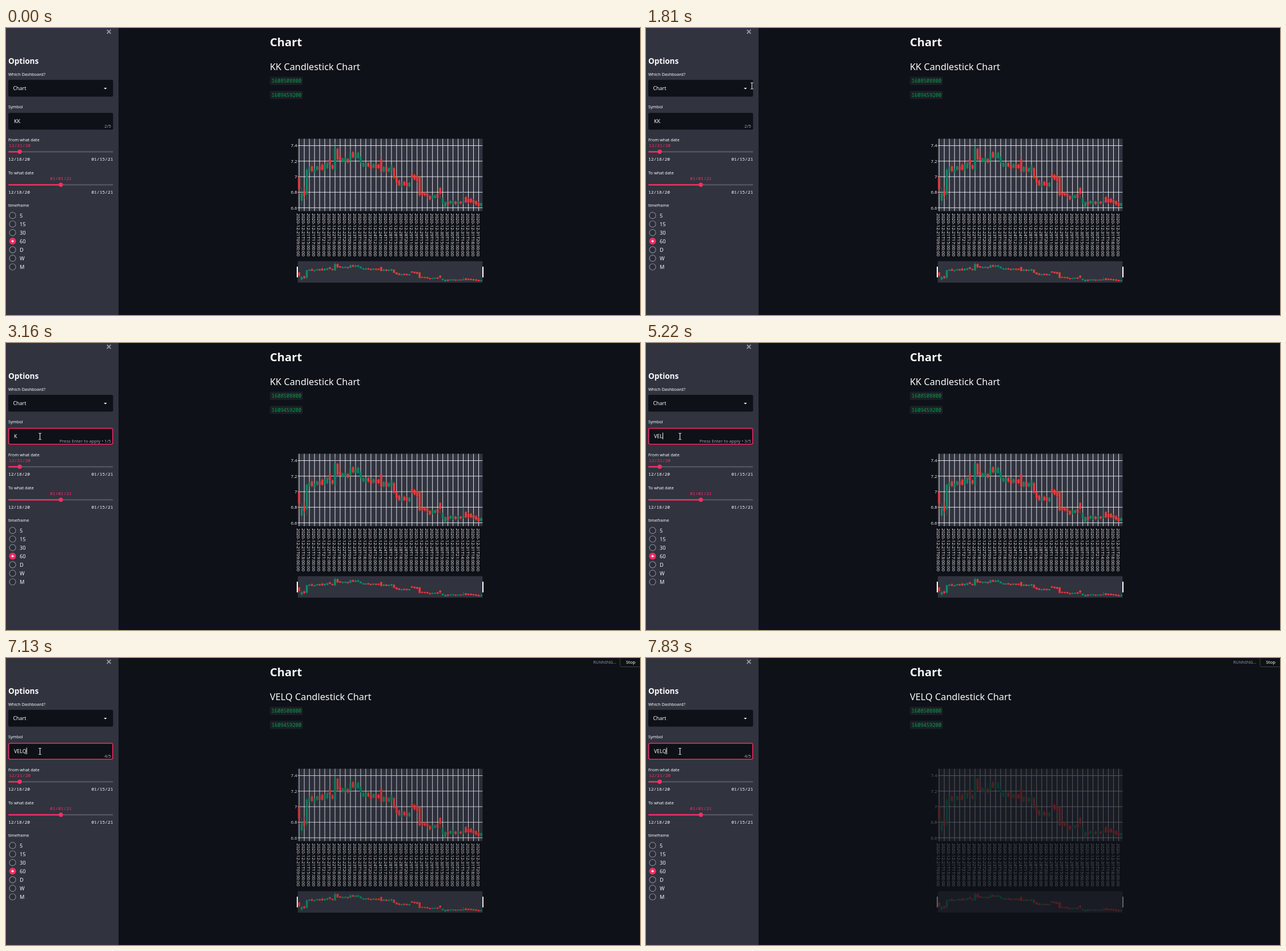
Write an HTML page that moves like this. It is 1110x504 px and loops after 8 s.

```html
<!DOCTYPE html>
<html lang="en">
<head>
<meta charset="utf-8">
<title>Candlestick dashboard</title>
<style>
  html, body { margin: 0; width: 100%; height: 100%; overflow: hidden; background: #0e1117; }
  svg { display: block; width: 100%; height: 100%; }
  text { font-family: "Noto Sans", sans-serif; fill: #fafafa; white-space: pre; }
  .mono { font-family: "Noto Sans Mono", monospace; }
  .tick { font-family: "Open Sans", sans-serif; }
  .red { fill: #f92d63; }
  .muted { fill: #a3a5ac; }
  .up { fill: #0f8a66; stroke: #0f8a66; }
  .down { fill: #e93c3c; stroke: #e93c3c; }
  #candles * { stroke-width: .7; vector-effect: non-scaling-stroke; }
  #tools path { fill: none; stroke: #5f6269; stroke-width: 1.4; }
  #tools path.lit { stroke: #b9bbc1; }
</style>
</head>
<body>
<svg id="stage" viewBox="0 0 1110 504" preserveAspectRatio="none"></svg>
<script>
const LOOP = 8000;
const FIRST = 'KK', SECOND = 'VELQ';
const RED = '#f92d63';

const text = (x, y, size, str, attrs = '') =>
  `<text x="${x}" y="${y}" font-size="${size}" ${attrs}>${str}</text>`;
const rect = (x, y, w, h, fill, attrs = '') =>
  `<rect x="${x}" y="${y}" width="${w}" height="${h}" fill="${fill}" ${attrs}/>`;
const path = (d, attrs = '') => `<path d="${d}" ${attrs}/>`;
const range = (n, fn) => Array.from({ length: n }, (_, i) => fn(i)).join('');

function slider(label, date, y, x) {
  return text(4, y - 18.5, 7.4, label) +
    text(x, y - 8, 7.9, date, 'class="mono red" text-anchor="middle"') +
    rect(4, y - 1, 183.5, 2.2, '#555762', 'rx="1"') +
    rect(4, y - 1, x - 4, 2.2, RED, 'rx="1"') +
    `<circle cx="${x}" cy="${y}" r="3.7" fill="${RED}"/>` +
    text(4, y + 15.8, 7.9, '12/18/20', 'class="mono"') +
    text(187.5, y + 15.8, 7.9, '01/15/21', 'class="mono" text-anchor="end"');
}

function radio(label, i) {
  const y = 329.2 + 15.05 * i;
  const dot = label === '60'
    ? `<circle cx="11.5" cy="${y}" r="6" fill="${RED}"/><circle cx="11.5" cy="${y}" r="1.9" fill="#fff"/>`
    : `<circle cx="11.5" cy="${y}" r="5.5" fill="#2b2d38" stroke="#85878e" stroke-width="1.2"/>`;
  return dot + text(24, y + 3.4, 9.2, label);
}

function sidebar() {
  return rect(0, 0, 197, 504, '#31333f') +
    path('M176.8 3.2l6.6 6.6M183.4 3.2l-6.6 6.6', 'stroke="#9a9ca4" stroke-width="1.8"') +
    text(4, 62.6, 13.5, 'Options', 'font-weight="700"') +
    text(4, 83.6, 7.4, 'Which Dashboard?') +
    rect(4, 91, 183.5, 29.5, '#0e1117', 'rx="2.5"') +
    text(12.5, 109, 8.9, 'Chart') +
    path('M171.4 105h5.2l-2.6 2.7z', 'fill="#fff"') +
    text(4, 140.8, 7.4, 'Symbol') +
    rect(4, 149, 183.5, 29.5, '#0e1117', 'rx="2.5"') +
    rect(4.7, 149.7, 182.1, 28, 'none', `id="focus" rx="2.2" stroke="${RED}" stroke-width="1.5"`) +
    text(14, 167, 8.9, '', 'id="symbol"') +
    path('M0 157.5v11.5', 'id="caret" stroke="#fff" stroke-width="1"') +
    text(184, 174.5, 7.7, '', 'id="hint" class="muted" text-anchor="end"') +
    slider('From what date', '12/21/20', 217.2, 24) +
    slider('To what date', '01/01/21', 275.2, 96) +
    text(4, 314, 7.4, 'timeframe') +
    ['5', '15', '30', '60', 'D', 'W', 'M'].map(radio).join('');
}

// Candle geometry in stage pixels; heights and wicks list only the exceptions.
const STEP = 4.49;
const tops = [
  262, 290, 286, 249, 245, 243, 248, 243, 243, 240, 240, 237,
  231, 241, 212, 212, 226, 229, 228, 230, 220, 218, 222, 219,
  227, 237, 238, 237, 241, 239, 240, 240, 230, 244, 244, 246,
  242, 246, 262, 268, 272, 270, 271, 272, 256, 258, 260, 262,
  289, 290, 290, 295, 295, 294, 292, 281, 300, 306, 305, 304,
  304, 305, 305, 305, 304, 297, 300, 300, 302, 304, 307, 308];
const heights = {
  0: 20, 1: 13, 2: 9, 3: 43, 5: 8, 9: 9, 10: 9, 11: 9, 12: 9, 14: 37, 15: 19,
  20: 13, 21: 9, 23: 9, 24: 9, 32: 22, 33: 8, 34: 8, 36: 8, 37: 17, 38: 10, 39: 8,
  45: 8, 46: 9, 47: 32, 48: 4, 49: 4, 52: 4, 53: 4, 55: 10, 56: 7, 57: 8,
  59: 4, 60: 4, 61: 4, 62: 4, 63: 3, 64: 3, 65: 9, 71: 4 };
const wicks = {
  0: [3, 10], 1: [9, 8], 2: [8, 5], 3: [3, 10], 5: [7, 3], 9: [8, 2], 14: [11, 4],
  20: [7, 2], 22: [8, 3], 32: [2, 3], 36: [2, 9], 55: [2, 9], 64: [16, 2] };
const trend = 'rgrggrggrr' + 'ggrrgrrggr' + 'grgggggrrg' + 'rrrgrggrrr' +
  'grrgrrrrrr' + 'rrggrrggrg' + 'grgrgrrrrr' + 'rg';

function candle(top, i) {
  const x = 513.2 + STEP * i, h = heights[i] || 6, [above, below] = wicks[i] || [2, 2.5];
  return `<g class="${trend[i] === 'g' ? 'up' : 'down'}">` +
    path(`M${x} ${top - above}V${top + h + below}`) +
    `<rect x="${x - 1.4}" y="${top}" width="2.8" height="${h}"/></g>`;
}

const hours = {
  21: '09 13 15 17 19 21', 22: '12 16 18 20', 23: '09 13 16 18 20', 24: '12 15 17',
  28: '12 15 18 20', 29: '11 13 15 17 19', 30: '13 15 17 19 21', 31: '14 16 18 20' };
const stamps = Object.entries(hours).flatMap(([day, list]) =>
  list.split(' ').map(hour => `2020-12-${day}T${hour}:00:00`));

function chart() {
  const grid = range(36, i => `M${513.2 + 2 * STEP * i} 194.5v127`) +
    range(5, i => `M510.8 ${206.5 + 27.3 * i}h323.6`);
  const axis = ['7.4', '7.2', '7', '6.8', '6.6'].map((v, i) =>
    text(509.6, 209.3 + 27.3 * i, 7.7, v, 'class="tick" text-anchor="end"')).join('');
  const dates = stamps.map((s, i) => {
    const x = 509.4 + 2 * STEP * i;
    return text(x, 325.5, 7.75, s, `class="tick" transform="rotate(90 ${x} 325.5)"`);
  }).join('');
  return '<g id="chart">' +
    rect(510.8, 194.5, 323.6, 127, '#31333f') +
    path(grid, 'stroke="#f2f2f4" stroke-width=".9"') +
    `<g id="candles">${tops.map(candle).join('')}</g>` + axis + dates +
    rect(510.8, 409.5, 323.6, 37.7, '#31333f') +
    '<use href="#candles" transform="matrix(1 0 0 .295 0 352.1)"/>' +
    rect(509, 419, 2, 19, '#fff', 'rx=".6"') + rect(834, 419, 2, 19, '#fff', 'rx=".6"') + '</g>';
}

// Icons are drawn around their centre point.
const icons = [
  [681.5, 'M-4.2 -2.2h2l1-1.2h2.4l1 1.2h2v5.6h-8.4zM-1.4 .5a1.4 1.4 0 1 0 2.8 0a1.4 1.4 0 1 0-2.8 0'],
  [700.5, 'M-3.6-1a2.9 2.9 0 1 0 5.8 0a2.9 2.9 0 1 0-5.8 0M1.5 1.2L4.6 4.3M-2.2-1h3M-.7-2.5v3', 1],
  [715.2, 'M-4.5 0h9M0-4.5v9M-3.3-1.3L-4.6 0l1.3 1.3M3.3-1.3L4.6 0 3.3 1.3M-1.3-3.3L0-4.6l1.3 1.3M-1.3 3.3L0 4.6l1.3-1.3'],
  [729.8, 'M-4.2-4.2h8.4v8.4h-8.4z', 0, '1.6 1.2'],
  [744.3, 'M-2.5 2.2C-6-1-3-4 .8-3.8S5.3 1 1.5 1.8S-3 .8-2.4 2.4L-3 4.6'],
  [763.5, 'M-3.3-3.3h6.6v6.6h-6.6zM-2 0h4M0-2v4'],
  [778, 'M-3.3-3.3h6.6v6.6h-6.6zM-2 0h4'],
  [792.3, 'M-4.4-4.4l8.8 8.8M4.4-4.4l-8.8 8.8M-4.4-2v-2.4h2.4M4.4-2v-2.4H2M-4.4 2v2.4H-2M4.4 2v2.4H2'],
  [807, 'M-4.6 .2L0-3.8 4.6 .2M-2.8 0v3.6h1.8V1H1v2.6h1.8V0'],
  [825.3, 'M-4.2-2.5h7.5M3.2-1v5', 0, '2 1'],
  [840.5, 'M-3.8 0l2.2-2h5.6v4h-5.6zM-2.5 0h6', 1],
  [855.2, 'M-3.8-2.2h7.8M-3.8 2.2h7.8M-3.8-1.2h7.8M-3.8 3.2h7.8'],
  [895, 'M-3.8-1v-2.8h2.8M-3.8-3.8l7.6 7.6M3.8 1v2.8H1', 1]];

function tools() {
  return '<g id="tools">' + icons.map(([x, d, lit, dash]) =>
    path(d, `transform="translate(${x} ${x > 880 ? 143.8 : 145})" class="${lit ? 'lit' : ''}" stroke-dasharray="${dash || 'none'}"`)
  ).join('') + rect(869.8, 140.5, 9, 9, '#4a5488') + '</g>';
}

function code(y, value) {
  return rect(462, y, 57.5, 14.5, '#1c1e28', 'rx="3"') +
    text(465, y + 10.3, 8.7, value, 'class="mono" style="fill:#09a040"');
}

const outlined = 'stroke-linejoin="round"';
const pointers =
  path('M0 0v10l2.3-2.1 1.6 3.6 1.6-.7L3.9 7.2H7z', `id="arrow" fill="#fff" stroke="#000" stroke-width=".7" ${outlined}`) +
  '<g id="resize">' +
    path('M-6.5 0l3.2-3v2.2h6.6V-3l3.2 3-3.2 3V.8h-6.6V3z', `fill="#fff" stroke="#000" stroke-width=".6" ${outlined}`) + '</g>' +
  path('M-2.3-5.3h1.8l.5.6.5-.6h1.8M0-4.7v9.6M-2.3 5.5h1.8l.5-.6.5.6h1.8', 'id="beam" fill="none" stroke="#fff" stroke-width="1"');

const stage = document.getElementById('stage');
stage.innerHTML = sidebar() +
  text(462, 32, 20.2, 'Chart', 'font-weight="700"') +
  text(462, 73.6, 16.3, '', 'id="title"') +
  code(85.5, '1608508800') + code(110.2, '1609459200') + chart() + tools() +
  '<g id="status">' + text(1028, 10.4, 7.4, 'RUNNING...', 'style="fill:#918ba8"') +
  rect(1075, -4, 50, 19.5, '#0e1117', 'rx="3" stroke="#3f414d"') +
  text(1085.5, 9.6, 7.8, 'Stop') + '</g>' + `<g id="cursor">${pointers}</g>`;

const el = id => document.getElementById(id);
const show = (id, on) => el(id).style.display = on ? '' : 'none';
const ramp = (t, start, length) => Math.min(1, Math.max(0, (t - start) / length));
const fade = (id, amount) => el(id).setAttribute('opacity', amount);

const track = [
  [190, 1091, 499], [960, 684, 261], [1030, 674.5, 208.5],
  [1810, 185.5, 101.5], [1880, 184, 103], [2300, 59.5, 163.8]];
const typing = [
  [0, FIRST], [3160, FIRST.slice(0, 1)], [3360, ''], [4620, SECOND.slice(0, 1)],
  [4820, SECOND.slice(0, 2)], [5220, SECOND.slice(0, 3)], [5680, SECOND]];
const blinks = [2500, 3030, 3560, 4090, 4620, 6230, 6740, 7270, 7800];

function moveCursor(t) {
  const next = track.findIndex(k => k[0] > t);
  const b = next < 0 ? track.at(-1) : track[next];
  const a = next < 0 ? b : track[Math.max(0, next - 1)];
  const p = a === b ? 0 : (t - a[0]) / (b[0] - a[0]);
  const x = a[1] + (b[1] - a[1]) * p, y = a[2] + (b[2] - a[2]) * p;
  const inPlot = x > 511 && x < 834 && y > 194 && y < 321;
  const inField = x < 188 && (y > 91 && y < 120 || y > 149);
  show('cursor', t >= 190);
  show('resize', inPlot);
  show('beam', inField);
  show('arrow', !inPlot && !inField);
  el('cursor').setAttribute('transform', `translate(${x} ${y})`);
}

function render(now) {
  const t = now % LOOP;
  moveCursor(t);
  fade('tools', ramp(t, 560, 250) - ramp(t, 1370, 250));

  const value = typing.findLast(k => k[0] <= t)[1];
  el('symbol').textContent = value;
  const pending = t >= 3160 && t < 6030;
  el('hint').textContent = (pending ? 'Press Enter to apply • ' : '') + value.length + '/5';
  fade('focus', ramp(t, 2430, 200));
  show('caret', blinks.filter(b => b <= t).length % 2);
  const end = value ? el('symbol').getComputedTextLength() : 0;
  el('caret').setAttribute('transform', `translate(${14.5 + end} 0)`);

  el('title').textContent = (t < 6300 ? FIRST : SECOND) + ' Candlestick Chart';
  fade('status', ramp(t, 6180, 190));
  fade('chart', 1 - .66 * ramp(t, 6770, 1000) ** 1.7);
  requestAnimationFrame(render);
}
requestAnimationFrame(render);
</script>
</body>
</html>
```
